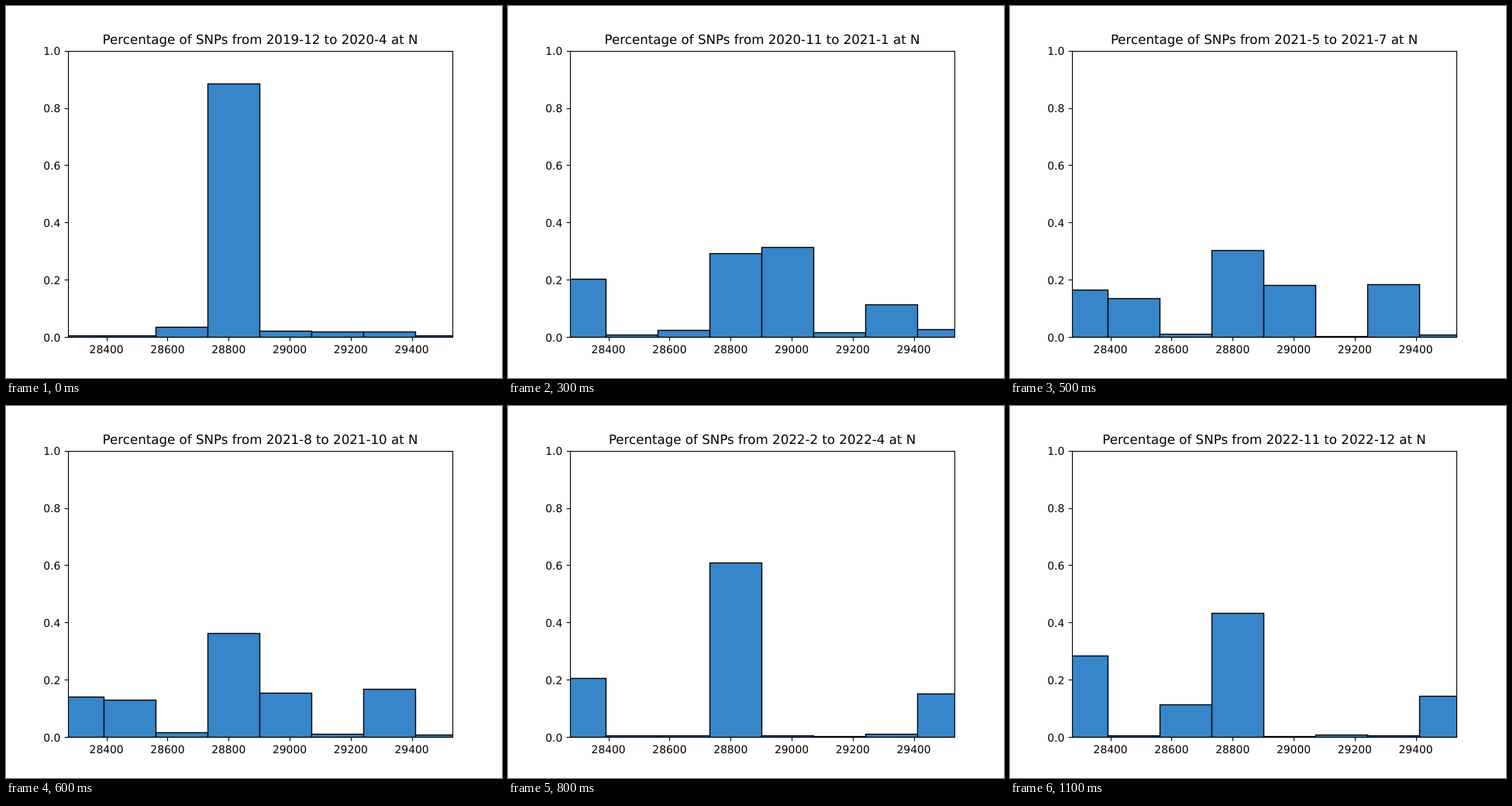
An HTML page for the animation above (1200 ms loop, 640x480 px).

```html
<!DOCTYPE html>
<html lang="en">
<head>
<meta charset="utf-8">
<title>Histogram over time</title>
<style>
  html, body { margin: 0; width: 100%; height: 100%; overflow: hidden; background: #fff; }
  svg { display: block; }
  text { font: 13.889px "DejaVu Sans", sans-serif; text-anchor: middle; text-rendering: geometricPrecision; }
  #title { font-size: 16.667px; }
  .y { text-anchor: end; }
  .axis { fill: none; stroke: #000; stroke-width: 1.11; }
  #bars rect { fill: #3786c9; stroke: #000; stroke-width: 1.39; }
</style>
</head>
<body>
<svg width="640" height="480" viewBox="0 0 640 480">
  <clipPath id="plot"><rect x="80" y="58" width="496" height="370"/></clipPath>
  <text id="title" x="328" y="49"></text>
  <g id="bars" clip-path="url(#plot)"></g>
  <g id="axes"><rect class="axis" x="80.5" y="58.5" width="496" height="369"/></g>
</svg>
<script>
const STEP = 100, COUNT = 12, BASE = 427;
const $ = id => document.getElementById(id);

// Top pixel row of each bar, by period; other periods lie midway between neighbours
const tops = {
  0: [425, 425, 414, 100, 419, 420, 420, 425],
  2: [427, 427, 427, 64, 425, 427, 425, 425],
  3: [352, 424, 418, 319, 311, 421, 385, 417],
  5: [366, 377, 423, 315, 360, 426, 359, 424],
  7: [383, 380, 419, 271, 380, 420, 371, 424],
  8: [351, 425, 425, 202, 425, 426, 423, 371],
  11: [322, 425, 385, 267, 426, 424, 425, 374]
};

function topsAt(i) {
  let a = i, b = i;
  while (!tops[a]) a--;
  while (!tops[b]) b++;
  const k = a === b ? 0 : (i - a) / (b - a);
  return tops[a].map((y, n) => Math.round(y + (tops[b][n] - y) * k));
}

// Quarterly periods; the first and last are irregular
function titleAt(i) {
  const month = m => `${2020 + Math.floor(m / 12)}-${(m + 12) % 12 + 1}`;
  const from = i ? 1 + 3 * i : -1;
  const to = i === COUNT - 1 ? 35 : 3 + 3 * i;
  return `Percentage of SNPs from ${month(from)} to ${month(to)} at N`;
}

function add(parent, tag, attrs, text = "") {
  const el = document.createElementNS("http://www.w3.org/2000/svg", tag);
  for (const key in attrs) el.setAttribute(key, attrs[key]);
  el.textContent = text;
  return parent.appendChild(el);
}

const snap = v => Math.round(v) + 0.5;
const px = v => 80 + (v - 28274) * 496 / 1259;
const py = v => 427.2 - v * 369.6;

for (let v = 28400; v <= 29400; v += 200) {
  add($("axes"), "path", { class: "axis", d: `M${snap(px(v))} 427.5v4.86` });
  add($("axes"), "text", { x: px(v), y: 448 }, v);
}
for (let n = 0; n <= 5; n++) {
  const y = py(n / 5);
  add($("axes"), "path", { class: "axis", d: `M80.5 ${snap(y)}h-4.86` });
  add($("axes"), "text", { class: "y", x: 70.3, y: Math.round(y + 5.3) }, (n / 5).toFixed(1));
}

const bars = Array.from({ length: 8 }, (_, n) => {
  const x = snap(px(28220 + 170 * n));
  return add($("bars"), "rect", { x, width: snap(px(28390 + 170 * n)) - x });
});

let shown = -1;
function show(i) {
  if (i === shown) return;
  shown = i;
  $("title").textContent = titleAt(i);
  topsAt(i).forEach((y, n) => {
    // A flat bar keeps a sliver so that its outline is still drawn
    bars[n].setAttribute("y", y + 0.5);
    bars[n].setAttribute("height", Math.max(BASE - y, 0.01));
  });
}

const start = performance.now();
function tick() {
  show(Math.floor((performance.now() - start) / STEP) % COUNT);
  requestAnimationFrame(tick);
}
tick();
</script>
</body>
</html>
```
